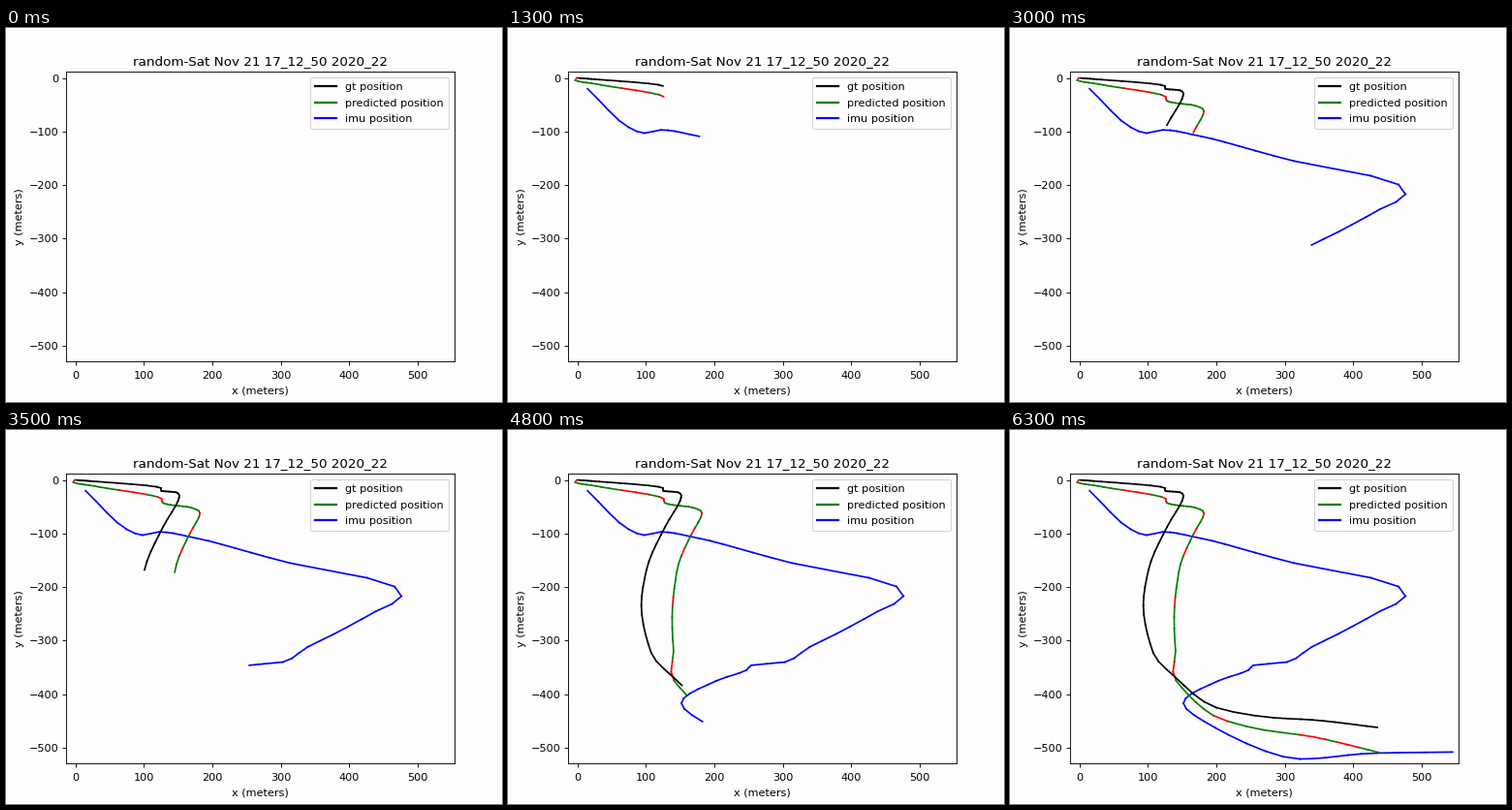
A matplotlib script for the animation above (6400 ms loop, 512x386 px).

```python
import numpy as np
import matplotlib.pyplot as plt
from matplotlib.animation import FuncAnimation
from matplotlib.collections import LineCollection
from matplotlib.lines import Line2D

W, H, DPI = 512, 386, 64
STEPS = np.arange(64)
K = 80.85 / DPI              # scales default point sizes to the stage
LEFT, RIGHT, TOP, BOTTOM = 62, 463, 45, 344
ORIGIN = np.array([71.5, 51.6])      # stage pixel of (0, 0) meters
SCALE = np.array([0.7073, -0.5527])  # pixels per meter
PAPER = "#fefdfe"

# Turning points as (step, x, y) in meters; the rest is interpolated.
GT = [
    (0, 1, 0), (7, 32, -3), (13, 125, -15), (15, 125.5, -20), (22, 147, -23),
    (24, 152, -29), (26, 150, -39), (30, 128, -88), (35, 101, -168),
    (39, 93.5, -234), (44, 108, -323), (47, 140, -368), (51, 200, -425),
    (54, 284, -444), (57, 340, -448), (63, 435, -462),
]
# Error of the prediction relative to the true position
DRIFT = [
    (0, -2, 0), (1, -8, -4), (7, 3, -10), (13, 1, -20), (22, 16, -27),
    (26, 32, -23), (33, 42, -7), (38, 46, -2), (43, 37, -13), (46, 14, -21),
    (50, 0, -14), (54, -14, -23), (57, 3, -32), (63, 3, -47),
]
IMU = [
    (0, 15, -20), (4, 75, -92), (6, 98, -103), (8, 122, -97), (13, 178, -109),
    (19, 313, -155), (22, 466, -199), (23, 476, -217), (25, 439, -245),
    (28, 377, -288), (30, 339, -312), (33, 303, -340), (35, 254, -346),
    (37, 247, -355), (40, 203, -375), (45, 152, -417), (49, 199, -463),
    (54, 322, -521), (60, 434, -510), (63, 545, -508),
]
# Steps at which the predicted segment is drawn in red
RED_STEPS = {1, 10, 11, 13, 14, 15, 27, 30, 33, 39, 45, 46, 52, 57, 58, 60, 61}


def glide(t, v):
    """Monotone cubic through the keys, sampled at every step."""
    h = np.diff(t)
    slope = np.diff(v) / h
    a, b = slope[:-1], slope[1:]
    inner = np.divide(2 * a * b, a + b, out=np.zeros_like(a), where=a * b > 0)
    m = np.r_[slope[0], inner, slope[-1]]
    i = np.clip(np.searchsorted(t, STEPS, side="right") - 1, 0, len(h) - 1)
    u = (STEPS - t[i]) / h[i]
    w = 1 - u
    return (v[i] * w * w * (1 + 2 * u) + v[i + 1] * u * u * (1 + 2 * w)
            + h[i] * u * w * (m[i] * w - m[i + 1] * u))


def track(keys):
    t, x, y = np.array(keys, float).T
    return np.column_stack([glide(t, x), glide(t, y)])


def to_meters(px):
    return (np.array(px) - ORIGIN) / SCALE


plt.rcParams.update({
    "font.family": "DejaVu Sans",
    "font.size": 10 * K,
    "axes.linewidth": 0.8 * K,
    "axes.titlepad": 6 * K,
    "axes.labelpad": 4 * K,
    "patch.linewidth": 1.0 * K,
    "xtick.major.pad": 5.3 * K,
    "ytick.major.pad": 3.5 * K,
})
for axis in ("xtick", "ytick"):
    plt.rcParams[f"{axis}.major.size"] = 3.5 * K
    plt.rcParams[f"{axis}.major.width"] = 0.8 * K

fig = plt.figure(figsize=(W / DPI, H / DPI), dpi=DPI, facecolor=PAPER)
ax = fig.add_axes([LEFT / W, 1 - BOTTOM / H,
                   (RIGHT - LEFT) / W, (BOTTOM - TOP) / H], facecolor=PAPER)
(x0, y0), (x1, y1) = to_meters([(LEFT, BOTTOM), (RIGHT, TOP)])
ax.set(xlim=(x0, x1), ylim=(y0, y1),
       xticks=range(0, 501, 100), yticks=range(-500, 1, 100),
       ylabel="y (meters)", title="random-Sat Nov 21 17_12_50 2020_22")
ax.set_xlabel("x (meters)", labelpad=5.4 * K)

labels = {"black": "gt position", "green": "predicted position",
          "blue": "imu position"}
handles = [Line2D([], [], color=c, lw=2 * K, label=s) for c, s in labels.items()]
ax.legend(handles=handles, loc="upper right", labelspacing=0.59, borderpad=0.47)

# Thin grey rule along the bottom edge of the stage
fig.add_artist(Line2D([0, 1], [0.5 / H] * 2, color="#c4c4c4", lw=72 / DPI))

# Segments in drawing order: three per step
gt = track(GT)
paths = [gt, gt + track(DRIFT), track(IMU)]
segments, colors = [], []
for step in STEPS[1:]:
    segments += [p[step - 1:step + 1] for p in paths]
    colors += ["black", "red" if step in RED_STEPS else "green", "blue"]

trails = LineCollection([], linewidths=1.5 * K, capstyle="projecting", zorder=2)
ax.add_collection(trails, autolim=False)


def update(step):
    count = 3 * step
    trails.set_segments(segments[:count])
    trails.set_color(colors[:count])
    return [trails]


anim = FuncAnimation(fig, update, frames=len(STEPS), interval=100,
                     repeat=True, repeat_delay=0, blit=False)
plt.show()
```
